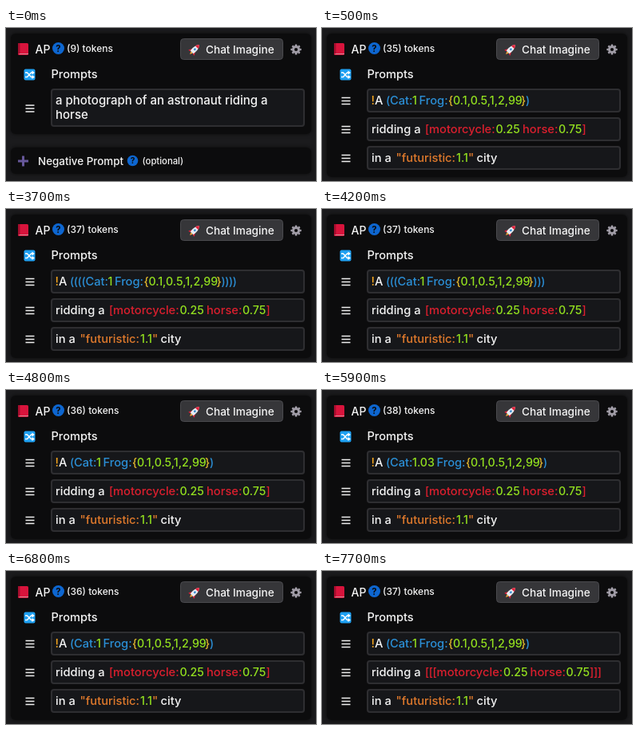
These frames come from a looping animation (388 px wide and 192 px high, 8000 ms). An HTML page with a canvas:

```html
<!DOCTYPE html>
<html lang="en">
<head>
<meta charset="utf-8">
<title>Prompt weights</title>
<style>
  html, body { margin: 0; width: 100%; height: 100%; overflow: hidden; background: #1b1b1d; }
  canvas { display: block; }
</style>
</head>
<body>
<canvas id="stage" width="388" height="192"></canvas>
<script>
const ctx = document.getElementById('stage').getContext('2d');
const LOOP = 8000;
const WHITE = '#f4f4f4', BLUE = '#2b8fd6', RED = '#dc1f2e', GREEN = '#93e01f',
      ORANGE = '#e07a2c', YELLOW = '#e4b92e';
const BRACKET_STEP = 4.8;

// start ms, token count, parentheses, weight, square brackets
const steps = [
  [500, 35, 1, '1', 1],
  [3300, 36, 2, '1', 1],
  [3500, 37, 3, '1', 1],
  [3700, 37, 4, '1', 1],
  [4200, 37, 3, '1', 1],
  [4500, 36, 2, '1', 1],
  [4800, 36, 1, '1', 1],
  [5500, 38, 1, '1.01', 1],
  [5700, 38, 1, '1.02', 1],
  [5900, 38, 1, '1.03', 1],
  [6300, 38, 1, '1.02', 1],
  [6500, 38, 1, '1.01', 1],
  [6800, 36, 1, '1', 1],
  [7500, 36, 1, '1', 2],
  [7700, 37, 1, '1', 3],
];

function text(str, x, y, size, color = WHITE, weight = 500) {
  ctx.font = `${weight} ${size}px Inter, sans-serif`;
  ctx.fillStyle = color;
  ctx.fillText(str, x, y);
}

const word = (str, x, y, color) => text(str, x, y, 14.7, color);
const number = (str, x, y) => text(str, x, y, 14.2, GREEN);

function brackets(char, count, x, y, color) {
  for (let i = 0; i < count; i++) text(char, x + i * BRACKET_STEP, y, 14, color);
}

function box(x, y, w, h, r, fill, stroke, line = 1) {
  ctx.beginPath();
  ctx.roundRect(x, y, w, h, r);
  ctx.fillStyle = fill;
  ctx.fill();
  if (!stroke) return;
  ctx.strokeStyle = stroke;
  ctx.lineWidth = line;
  ctx.stroke();
}

function disc(x, y, r, fill) {
  ctx.beginPath();
  ctx.arc(x, y, r, 0, 2 * Math.PI);
  ctx.fillStyle = fill;
  ctx.fill();
}

function shape(path, fill) {
  ctx.fillStyle = fill;
  ctx.fill(new Path2D(path));
}

function stroke(path, color, width) {
  ctx.strokeStyle = color;
  ctx.lineWidth = width;
  ctx.stroke(new Path2D(path));
}

function help(x, y, r) {
  disc(x, y, r, '#0d66d0');
  ctx.textAlign = 'center';
  text('?', x, y + r * .55, r * 1.5, '#0b0c0f', 700);
  ctx.textAlign = 'left';
}

function panel(y, h) {
  ctx.shadowColor = '#000a';
  ctx.shadowBlur = 5;
  box(6, y, 376, h, 6, '#0c0c0d');
  ctx.shadowBlur = 0;
}

const field = (y, h) => box(57, y, 316, h, 3, '#16171a', '#2e2e31', 2);
const handle = y => stroke(`M24.5 ${y - 4}h11m-11 4h11m-11 4h11`, '#f0f0f0', 1.6);

function book() {
  box(15, 19, 13, 15, 1.5, '#d8143c');
  shape('M15 19h2.5v13H15z', '#a30d2d');
  shape('M16.5 32H28v1H16.5z', '#d98a98');
}

function shuffle() {
  box(22.5, 51.5, 14, 14, 2, '#1ea0f2');
  stroke('M24 56h2.5l5 5.5h2.5M24 61.5h2.5l5-5.5h2.5', '#fff', 1.3);
  shape('M32.5 53.5l3.5 2.5-3.5 2.5zM32.5 59l3.5 2.5-3.5 2.5z', '#fff');
}

function rocket() {
  ctx.save();
  ctx.translate(236, 27);
  ctx.rotate(Math.PI / 4);
  ctx.scale(.85, .95);
  shape('M-3 1L-6 6h3zM3 1L6 6H3z', '#e2243d');
  shape('M-2 5H2L0 9z', '#f6a63a');
  shape('M0-9C4-5 4 1 3 5H-3C-4 1-4-5 0-9z', '#e9edf2');
  shape('M0-9C1.8-7 2.6-5.4 3-4H-3C-2.6-5.4-1.8-7 0-9z', '#e2243d');
  disc(0, -.5, 1.6, '#3f8fd0');
  ctx.restore();
}

function gear() {
  ctx.save();
  ctx.translate(363, 27);
  for (let i = 0; i < 8; i++) {
    box(-1.3, -6.6, 2.6, 4, .5, '#a09ca6');
    ctx.rotate(Math.PI / 4);
  }
  disc(0, 0, 4.9, '#a09ca6');
  disc(0, 0, 2.1, '#0c0c0d');
  ctx.restore();
}

function header(tokens, baseline) {
  book();
  text('AP', 36.5, baseline, 14);
  help(65.5, 25.5, 7.5);
  text(`(${tokens}) tokens`, 76, 30, 12);
  box(218.5, 13.5, 128, 26, 4, '#363639', '#4a4a4e');
  rocket();
  text('Chat Imagine', 250, 32, 13.6);
  gear();
  shuffle();
  text('Prompts', 56.5, 62.5, 14.6);
}

function drawSimple() {
  panel(7, 126);
  header(9, 31.5);
  field(77, 46);
  handle(101);
  text('a photograph of an astronaut riding a', 62, 96, 15);
  text('horse', 62, 114, 15);
  panel(150, 33);
  stroke('M15 167h13M21.5 160.5v13', '#66579a', 3);
  text('Negative Prompt', 40, 171.5, 13.4);
  help(158.5, 166.5, 6.8);
  text('(optional)', 170.5, 170.5, 11.3);
}

function drawWeighted([, tokens, parens, weight, squares]) {
  panel(7, 180);
  header(tokens, 32);
  for (const y of [77, 113, 149]) {
    field(y, 28);
    handle(y + 14.5);
  }

  let y = 96, shift = (parens - 1) * BRACKET_STEP;
  word('!', 61.5, y, '#f0a31e');
  word('A', 66, y);
  brackets('(', parens, 80, y, BLUE);
  word('Cat:', 85 + shift, y, BLUE);
  number(weight, 113 + shift, y);
  shift += ctx.measureText(weight).width - ctx.measureText('1').width;
  word('Frog:', 121.5 + shift, y, BLUE);
  text('{', 158 + shift, y, 14, YELLOW);
  number('0.1,0.5,1,2,99', 164 + shift, y);
  text('}', 249 + shift, y, 14, YELLOW);
  brackets(')', parens, 255 + shift, y, BLUE);

  y = 132;
  shift = (squares - 1) * BRACKET_STEP;
  word('ridding a', 62, y);
  brackets('[', squares, 129, y, RED);
  word('motorcycle:', 134 + shift, y, RED);
  number('0.25', 217.5 + shift, y);
  word('horse:', 251 + shift, y, RED);
  number('0.75', 296 + shift, y);
  brackets(']', squares, 325.5 + shift, y, RED);

  y = 168;
  word('in a', 62, y);
  word('"futuristic:', 92.5, y, ORANGE);
  number('1.1', 168, y);
  word('"', 183, y, ORANGE);
  word('city', 193.5, y);
}

function frame(now) {
  const t = now % LOOP;
  const step = steps.findLast(([start]) => t >= start);
  ctx.fillStyle = '#1b1b1d';
  ctx.fillRect(0, 0, 388, 192);
  if (step) drawWeighted(step);
  else drawSimple();
  requestAnimationFrame(frame);
}
frame(0);
</script>
</body>
</html>
```
